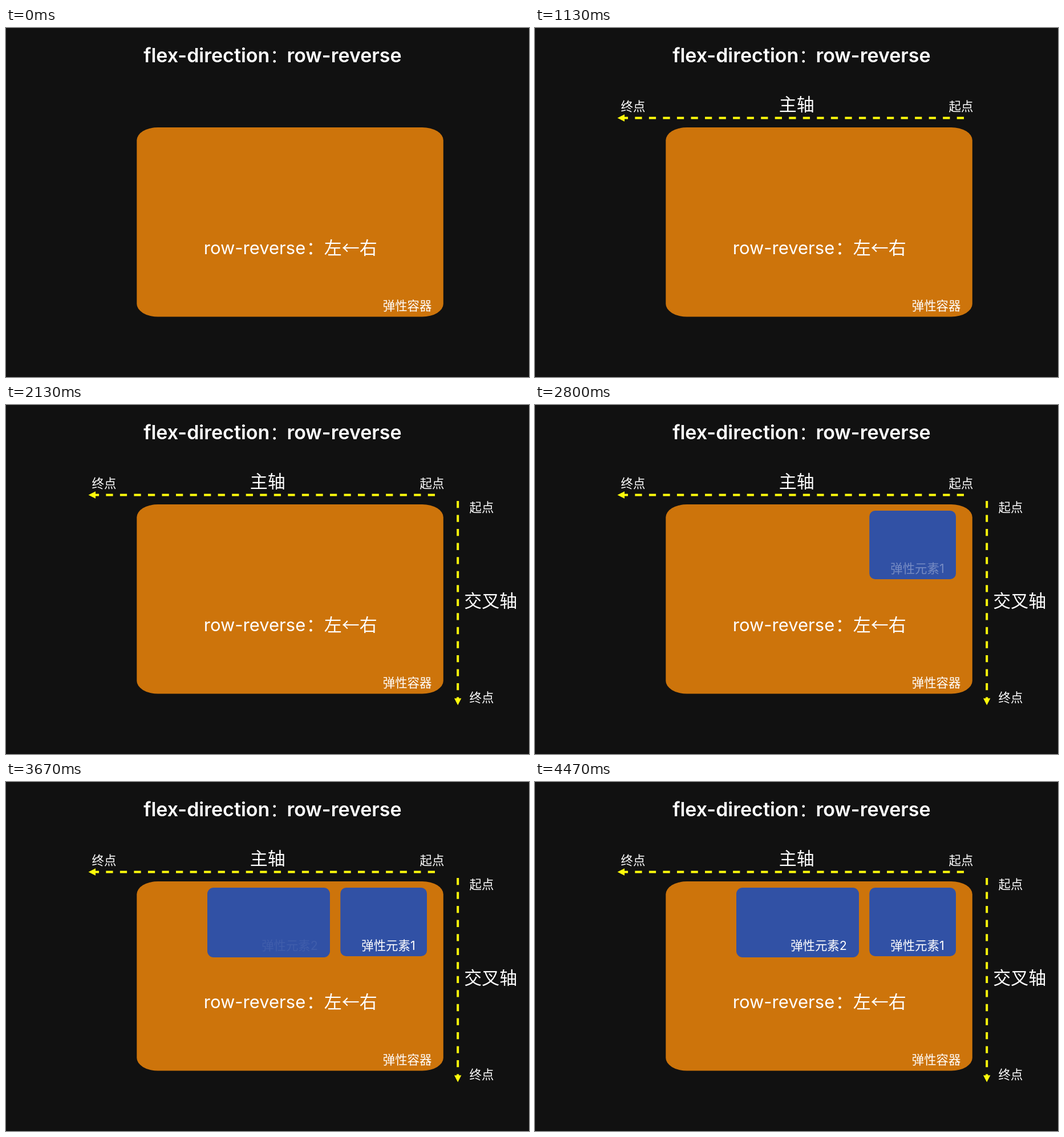
Recreate the animation shown at these times as an HTML page. Size 917 by 611 pixels, loop 4.54 s.

```html
<!DOCTYPE html>
<html lang="zh-CN">
<head>
<meta charset="utf-8">
<title>flex-direction</title>
<style>
  html, body { margin: 0; width: 100%; height: 100%; overflow: hidden; background: #111; }
  svg { display: block; width: 917px; height: 611px; }
  text {
    fill: #fff;
    font: 21.4px "Noto Sans CJK SC", "Noto Sans CJK", sans-serif;
    font-optical-sizing: none;
    text-anchor: middle;
  }
  .latin { font-family: Inter, sans-serif; }
  .big { font-size: 31px; }
  .title { font-size: 34px; font-weight: 600; }
  .colon { font-size: 31px; font-weight: 400; }
  .start { text-anchor: start; }
  .axis line { stroke: #fefb0b; stroke-width: 4; stroke-dasharray: 12.27; }
  .axis path { fill: #fefb0b; }
  .item rect { fill: #3151a5; }
</style>
</head>
<body>
<svg viewBox="0 0 917 611">
  <rect width="917" height="611" fill="#111"/>
  <text class="latin title" x="351.8" y="59.8">flex-direction</text>
  <text class="colon start" x="463" y="59.8">：</text>
  <text class="latin title" x="593" y="59.8">row-reverse</text>

  <rect x="229.3" y="174" width="537.5" height="331.5" rx="37" ry="22.5" fill="#cd740b"/>
  <text class="latin big" x="436" y="395.8">row-reverse</text>
  <text class="big start" x="526.8" y="395.8">：左←右</text>
  <text x="703.6" y="494">弹性容器</text>

  <g class="axis" id="main">
    <line x1="752" y1="157.5" x2="155" y2="157.5"/>
    <path d="M144.5 157.5 L157 151.3 V163.7 Z"/>
    <g class="label">
      <text x="172" y="145">终点</text>
      <text class="big" x="458.7" y="144.7">主轴</text>
      <text x="747" y="145">起点</text>
    </g>
  </g>

  <g class="axis" id="cross">
    <line x1="792.2" y1="168" x2="792.2" y2="515"/>
    <path d="M792.2 525.6 L786 513.5 H798.4 Z"/>
    <g class="label">
      <text x="834" y="187.2">起点</text>
      <text class="big" x="849.8" y="353.8">交叉轴</text>
      <text x="834" y="519.8">终点</text>
    </g>
  </g>

  <g class="item" id="item1">
    <rect x="586.3" y="185" width="151.7" height="120" rx="10"/>
    <g class="label">
      <text class="start" x="623.3" y="293.6">弹性元素<tspan class="latin">1</tspan></text>
    </g>
  </g>

  <g class="item" id="item2">
    <rect x="353" y="185" width="215" height="122" rx="11"/>
    <g class="label">
      <text class="start" x="448.2" y="293.6">弹性元素<tspan class="latin">2</tspan></text>
    </g>
  </g>
</svg>
<script>
  const LOOP = 4540, FPS = 15, FADE = 7.5;

  // Shapes appear at tick `from`; their labels are fully faded in at tick `to`.
  const builds = [
    { id: 'main', from: 12, to: 17 },
    { id: 'cross', from: 26, to: 32 },
    { id: 'item1', from: 42, to: 47 },
    { id: 'item2', from: 55, to: 62 }
  ].map(b => {
    const group = document.getElementById(b.id);
    return { ...b, group, label: group.querySelector('.label') };
  });

  const clamp = v => Math.max(0, Math.min(1, v));

  function draw(ms) {
    const tick = Math.floor((ms % LOOP + 4) * FPS / 1000);
    for (const { group, label, from, to } of builds) {
      group.style.visibility = tick >= from ? 'visible' : 'hidden';
      label.style.opacity = clamp(1 - (to - tick) / FADE);
    }
  }

  let begin;
  function loop(now) {
    begin ??= now;
    draw(now - begin);
    requestAnimationFrame(loop);
  }
  draw(0);
  requestAnimationFrame(loop);
</script>
</body>
</html>
```
